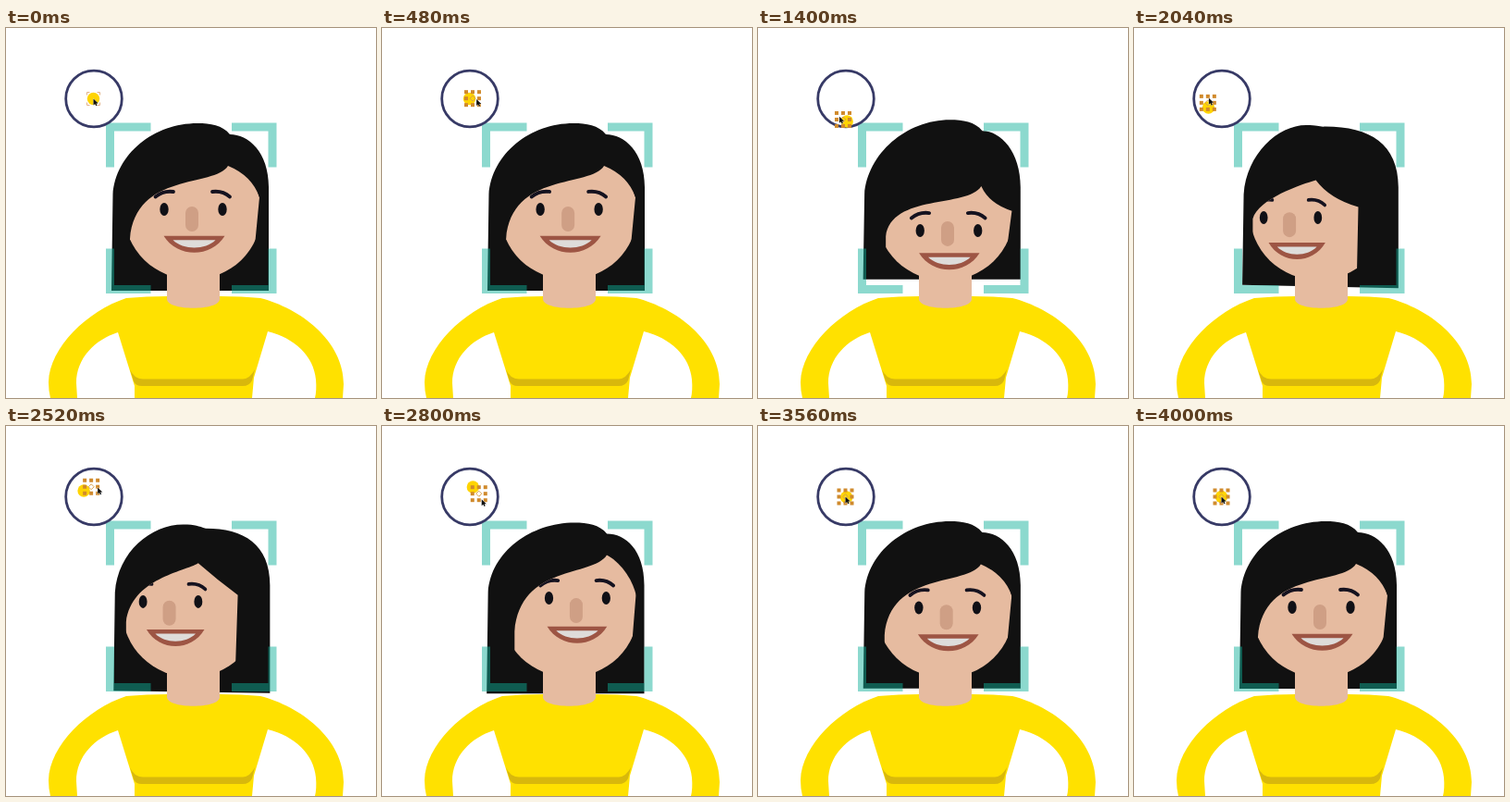
Animation of 400 by 400 pixels, one loop 4040 ms. Source, as an HTML page with a canvas:

```html
<!DOCTYPE html>
<html lang="en">
<head>
<meta charset="utf-8">
<title>Face controlled by a joystick</title>
<style>
  html, body { margin: 0; width: 100%; height: 100%; overflow: hidden; background: #fff; }
  canvas { display: block; width: 400px; height: 400px; }
</style>
</head>
<body>
<canvas id="stage" width="400" height="400"></canvas>
<script>
const ctx = document.getElementById('stage').getContext('2d');
const LOOP = 4040, STEP = 40, START = 160;
const SELECTION_LEAD = 160, CURSOR_LEAD = 300;
const SKIN = '#e6bba0', HAIR = '#111', YELLOW = '#ffe100';
const HOME = { x: 94.5, y: 76.5 };

// One clockwise turn of the knob: time and offset from home.
const TURN = [
  [460, 0, 0], [840, 8.7, 1.5], [1120, 7.5, 15], [1400, 1.7, 24.5], [2040, -14, 9.5],
  [2520, -10.4, -6.5], [2780, 3, -11], [3120, 13.2, 3], [3660, 0, 0]
];

// Smooth Hermite curve through the turn, at rest at both ends.
function knobOffset(time) {
  const last = TURN.length - 1;
  const t = Math.min(Math.max(time, TURN[0][0]), TURN[last][0]);
  let i = 0;
  while (i < last - 1 && t > TURN[i + 1][0]) i++;
  const a = TURN[i], b = TURN[i + 1], span = b[0] - a[0], u = (t - a[0]) / span;
  const slope = (k, axis) => k === 0 || k === last ? 0
    : (TURN[k + 1][axis] - TURN[k - 1][axis]) / (TURN[k + 1][0] - TURN[k - 1][0]);
  return [1, 2].map(axis => a[axis] + (b[axis] - a[axis]) * u * u * (3 - 2 * u)
    + span * u * (1 - u) * ((1 - u) * slope(i, axis) - u * slope(i + 1, axis)));
}

function fill(path, color) {
  ctx.fillStyle = color;
  ctx.fill(new Path2D(path));
}

function stroke(path, color, width) {
  ctx.strokeStyle = color;
  ctx.lineWidth = width;
  ctx.stroke(new Path2D(path));
}

function ellipse(x, y, rx, ry, color) {
  ctx.beginPath();
  ctx.ellipse(x, y, rx, ry, 0, 0, 2 * Math.PI);
  ctx.fillStyle = color;
  ctx.fill();
}

function at(x, y, draw, scaleX = 1) {
  ctx.save();
  ctx.translate(x, y);
  ctx.scale(scaleX, 1);
  draw();
  ctx.restore();
}

function drawBody() {
  fill(`M130 292 Q152 290 175 290 H231 Q255 290 275 292
    C318 303 365 338 365 385 L364 400 H334 Q336 392 335 380 C333 355 312 335 283 328
    L268 378 L266 400 H139 L139 387 L121 329
    C96 337 76 357 76 384 L77 400 H48 Q46 392 46 383 C47 345 88 306 130 292Z`, YELLOW);
  fill('M134 369 Q138 379 148 379.5 H256 Q264 379 269 369 L266 381 Q263 387 256 387 H147 Q140 387 138 382Z', '#d8b80c');
}

function drawNeck() {
  fill('M174 245 H231 V293 C231 306 174 306 174 293Z', SKIN);
}

function drawHair(dx, dy, left) {
  const top = 103 - .15 * dy + .25 * left, bottom = 284 - .5 * dy;
  const l = 115.5 - .22 * dx, r = 284 - .13 * dx;
  const partX = 242 + (dx < 0 ? 2.5 : .3) * dx, partY = top + 12 - .75 * left;
  const crownX = partX - 35 + left;
  fill(`M${l} 180 C${l + 3} 136 ${partX - 82 + 2.2 * left} ${top} ${crownX} ${top}
    C${crownX + 14} ${top} ${partX - 8} ${top + 2} ${partX} ${partY}
    C${partX + 20 + 2 * left} ${partY} ${r} ${134 - .6 * left} ${r} 172
    V${bottom + .15 * left} L${l - 1.5} ${bottom - .1 * left}Z`, HAIR);
}

// The part of the face left open by the fringe and the side hair.
function faceOpening(dx, dy, left, right) {
  const ax = 134 + 2.45 * right - .4 * left, ay = 228 - 1.55 * (left + right);
  const tipX = 240 + .8 * right - 3.1 * left, tipY = 149 + .9 * dy + .5 * left;
  const bx = 274 + .25 * right - 2.25 * left, by = 183 + .6 * dy + .35 * left;
  const cx = 269 + .4 * right - 2 * left, cy = 235 - .7 * right + 2 * left;
  const bend = Math.max(-8, Math.min(9, 9 - .7 * dy - 1.4 * left));
  return new Path2D(`M${ax} ${ay}
    C${ax + 6} ${tipY + 6 + right + left} ${tipX - 15} ${tipY + 24 - 1.4 * left} ${tipX} ${tipY}
    Q${(tipX + bx) / 2 + bend} ${(tipY + by) / 2 - .7 * bend} ${bx} ${by}
    L${cx} ${cy} V290 H${ax}Z`);
}

function drawFeatures(dx, dy) {
  const squeeze = 1 - .005 * Math.abs(dx), x = 201 + 2.35 * dx;
  at(x, 193 + .65 * dy, () => {
    ctx.fillStyle = '#cf9f85';
    ctx.beginPath();
    ctx.roundRect(-7, 0, 14, 27, 7);
    ctx.fill();
  });
  at(x, 196 + .94 * dy, () => {
    for (const eyeX of [-30, 33]) ellipse(eyeX, 0, 4.7, 7, '#101016');
    ctx.lineCap = 'round';
    stroke('M-39.5 -13.5 Q-31 -20.5 -20 -19 M22 -19 Q33 -20.5 41 -13.5', '#15121f', 3.8);
  }, squeeze);
  at(203.5 + 1.95 * dx, 224.8 + .75 * dy, () => {
    fill('M-33 0 H33 C18 24 -18 24 -33 0Z', '#9d5544');
    fill('M-23 4.5 H23 C12 15.5 -12 15.5 -23 4.5Z', '#dedcda');
  }, squeeze);
}

function drawFigure(dx, dy) {
  const left = Math.max(-dx, 0), right = Math.max(dx, 0);
  const opening = faceOpening(dx, dy, left, right);
  const insideFace = draw => {
    ctx.save();
    ctx.clip(opening);
    draw();
    ctx.restore();
  };
  drawHair(dx, dy, left);
  insideFace(() => ellipse(202 + .2 * dx, 200 + .05 * dy, 74, 72, SKIN));
  drawBody();
  drawNeck();
  insideFace(() => drawFeatures(dx, dy));
}

function drawBrackets() {
  ctx.lineCap = 'butt';
  stroke(`M112.5 150.5 V107 H156.5 M244 107 H288 V150.5
    M288 238.5 V282.5 H244 M156.5 282.5 H112.5 V238.5`, 'rgba(13,175,152,.475)', 9);
}

function drawSelection(active) {
  if (!active) {
    stroke('M-7 -4 V-7 H-4 M4 -7 H7 V-4 M7 4 V7 H4 M-4 7 H-7 V4', '#e0b088', 1);
    return;
  }
  ctx.fillStyle = '#d08a2c';
  for (const i of [-1, 0, 1]) for (const j of [-1, 0, 1]) {
    if (i || j) ctx.fillRect(i * 7 - 2, j * 7 - 2, 4, 4);
  }
  stroke('M0 -3 L3 0 L0 3 L-3 0Z', '#d9a04a', 1);
}

function drawCursor() {
  const arrow = 'M0 0 V7 L1.7 5.5 L2.8 7.8 L4 7.2 L3 5 H5.2Z';
  stroke(arrow, 'rgba(255,255,255,.6)', 1);
  fill(arrow, '#111');
}

// The mouse runs ahead, the selection follows it and the knob trails behind.
function drawJoystick(time) {
  const follow = (lead, draw) => {
    const [dx, dy] = knobOffset(time + lead);
    at(HOME.x + dx, HOME.y + dy, draw);
  };
  ctx.beginPath();
  ctx.arc(95, 76.5, 30.3, 0, 2 * Math.PI);
  ctx.strokeStyle = '#373a66';
  ctx.lineWidth = 2.8;
  ctx.stroke();
  follow(0, () => ellipse(0, 0, 6.7, 6.7, '#ffd400'));
  follow(SELECTION_LEAD, () => drawSelection(time >= START));
  follow(CURSOR_LEAD, drawCursor);
}

function render() {
  const time = Math.floor(performance.now() % LOOP / STEP) * STEP;
  ctx.clearRect(0, 0, 400, 400);
  drawFigure(...knobOffset(time));
  drawBrackets();
  drawJoystick(time);
  requestAnimationFrame(render);
}
render();
</script>
</body>
</html>
```
